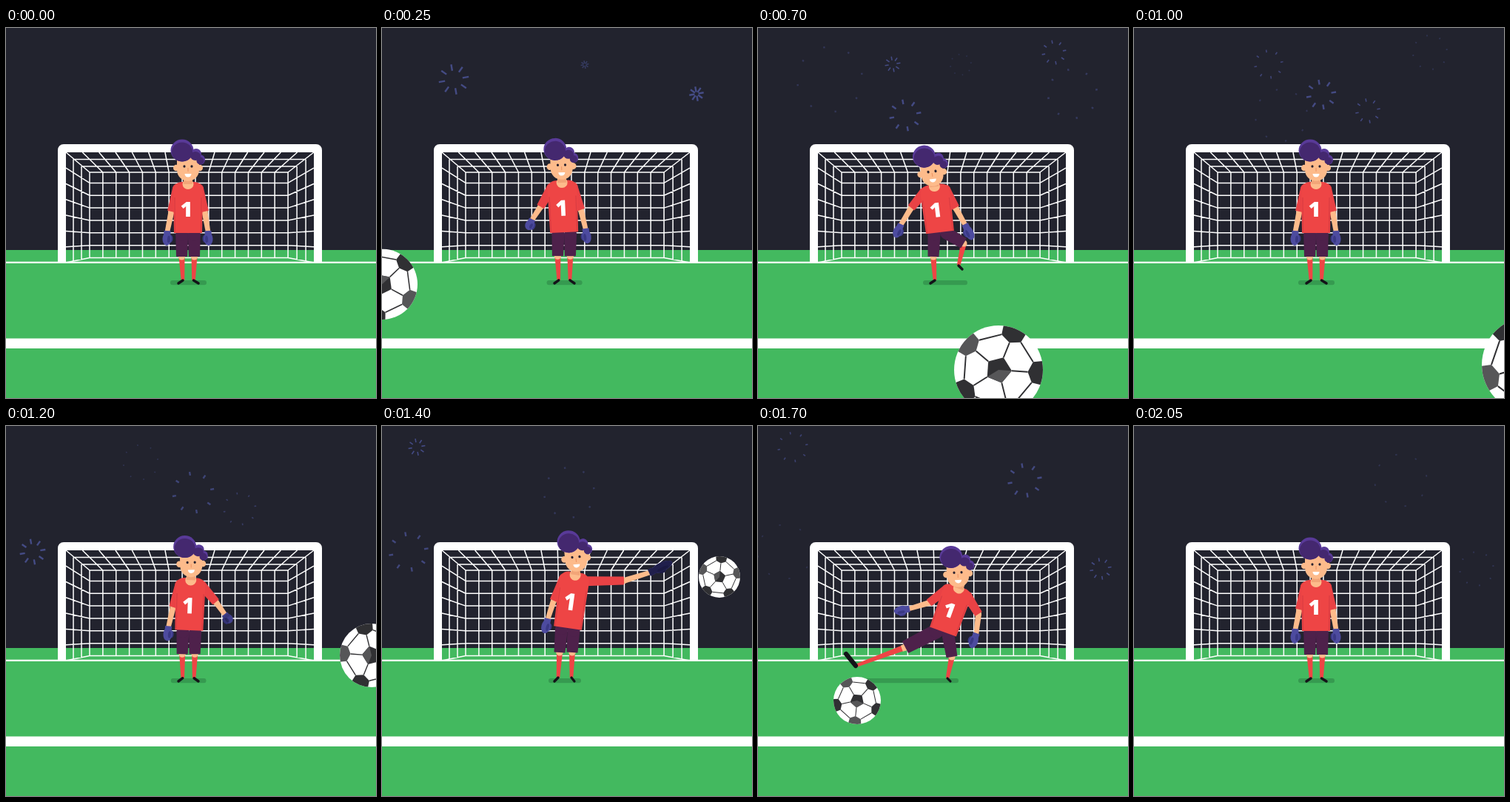
An HTML page with a canvas that plays this animation: 500 px wide and 500 px high, repeating every 2.1 s.

```html
<!DOCTYPE html>
<html lang="en">
<head>
<meta charset="utf-8">
<title>Goalkeeper</title>
<style>
  html, body { margin: 0; width: 100%; height: 100%; overflow: hidden; background: #22232e; }
  canvas { display: block; width: 100vw; height: 100vh; }
</style>
</head>
<body>
<canvas id="stage"></canvas>
<script>
const LOOP = 2100, STEP = 50, RAD = Math.PI / 180, TAU = Math.PI * 2;
const canvas = document.getElementById('stage');
const ctx = canvas.getContext('2d');
const SKIN = '#fdbb8b', RED = '#ee4545', SHORTS = '#4e214b', GLOVE = '#4d4b9f';

// Limbs hold three points: arm = elbow, wrist, fingertip; leg = knee, ankle, toe.
const idle = {
  head: [246, 187, 0], torso: [246, 277, 0, 1],
  lArm: [223.5, 248, 218, 275, 217, 294], rArm: [268.5, 248, 273, 275, 274, 294],
  lLeg: [237.5, 309, 239, 341, 233, 345], rLeg: [254.5, 309, 253.5, 341, 260, 345],
  shadow: [222, 271], shade: [0]
};
const saveLeft = {
  ...idle, head: [228.5, 177.5, -9], torso: [247, 273, -13, 1.1],
  lArm: [177, 215, 141, 196, 113, 185], rArm: [270, 236, 284, 259, 294, 280],
  lLeg: [237, 305, 238, 340, 233, 345], rLeg: [254, 305, 256, 340, 260, 345],
  shadow: [225, 269]
};
const kickEnd = {
  ...idle, head: [235, 194, -7], torso: [246, 276, -7, .94],
  lArm: [207, 243, 193, 266, 185, 283], rArm: [267, 243, 280, 266, 290, 286],
  lLeg: [237, 309, 239, 341, 233, 345], rLeg: [278, 291, 271, 321, 276, 326],
  shadow: [223, 283]
};
const saveRight = {
  ...idle, head: [262, 177, -5], torso: [251, 273, 8, 1.1],
  lArm: [232, 236, 224, 261, 219, 280], rArm: [327, 209, 362, 198, 392, 184],
  lLeg: [240, 306, 238, 340, 233, 345], rLeg: [257, 306, 256, 340, 260, 345],
  shadow: [225, 269], shade: [1]
};
const kickLeft = {
  ...idle, head: [270, 198, -3], torso: [250, 278, 20, .94],
  lArm: [231, 239, 204, 247, 184, 251], rArm: [298, 254, 295, 281, 288, 300],
  lLeg: [199, 299, 132, 324, 119, 308], rLeg: [262, 312, 256, 341, 260, 345],
  shadow: [132, 271]
};
const flipX = a => a.map((v, i) => i % 2 ? v : 492 - v);
const mirror = p => ({
  head: [492 - p.head[0], p.head[1], -p.head[2]],
  torso: [492 - p.torso[0], p.torso[1], -p.torso[2], p.torso[3]],
  lArm: flipX(p.rArm), rArm: flipX(p.lArm), lLeg: flipX(p.rLeg), rLeg: flipX(p.lLeg),
  shadow: [492 - p.shadow[1], 492 - p.shadow[0]], shade: [0]
});
const poses = [
  [0, idle], [150, idle], [500, saveLeft], [625, mirror(kickLeft)], [700, kickEnd], [850, idle],
  [1100, idle], [1400, saveRight], [1450, saveRight], [1650, kickLeft], [1700, kickLeft],
  [1900, idle], [LOOP, idle]
];

// time, x, y, radius, spin
const ballKeys = [
  [0, -80, 600, 85, -270], [50, -50, 500, 72, -255], [100, -35, 455, 65, -240],
  [300, 12, 310, 42, -170], [500, 49, 204, 27, -100], [600, 385, 330, 28, -40],
  [635, 366, 371, 32, -30], [700, 325, 462, 60, 4], [750, 295, 585, 90, 25],
  [800, 300, 650, 110, 45], [900, 600, 640, 100, 70], [950, 555, 510, 74, 80],
  [1000, 535, 455, 65, 91], [1200, 494, 310, 43, 112], [1400, 456, 204, 28, 132],
  [1450, 425, 200, 27, 120], [1650, 118, 335, 29, 42], [1700, 134, 371, 32, 24],
  [1750, 157, 432, 48, 0], [1800, 182, 510, 72, -30], [1850, 205, 615, 100, -60],
  [LOOP, -80, 600, 85, -270]
];

// x, y, reach, start, life
const bursts = [
  [97, 69.5, 46, 107, 632], [425, 89, 36, 204, 562], [199, 118, 36, 500, 520],
  [253, 90, 36, 760, 700], [36, 170, 37, 1030, 680], [360.5, 73.5, 36, 1410, 660],
  [274, 49.5, 15, 175, 580], [400, 33, 24, 388, 651], [182, 49, 24, 563, 660],
  [316, 112, 24, 700, 600], [47, 28.5, 24, 1243, 638], [463, 193, 24, 1445, 655]
];

const mix = (a, b, u) => a.map((v, i) => v + (b[i] - v) * u);

function span(keys, t) {
  let i = 0;
  while (i < keys.length - 2 && keys[i + 1][0] <= t) i++;
  const a = keys[i], b = keys[i + 1];
  return [a, b, (t - a[0]) / (b[0] - a[0])];
}

function poseAt(t) {
  const [a, b, k] = span(poses, t), u = k * k * (3 - 2 * k), pose = {};
  for (const part in idle) pose[part] = mix(a[1][part], b[1][part], u);
  return pose;
}

function rect(x, y, w, h, color) {
  ctx.fillStyle = color;
  ctx.fillRect(x, y, w, h);
}

function oval(x, y, rx, ry, color) {
  ctx.fillStyle = color;
  ctx.beginPath();
  ctx.ellipse(x, y, rx, ry, 0, 0, TAU);
  ctx.fill();
}

function line(x1, y1, x2, y2) {
  ctx.moveTo(x1, y1);
  ctx.lineTo(x2, y2);
}

function poly(points, color) {
  ctx.fillStyle = color;
  ctx.beginPath();
  points.forEach(p => ctx.lineTo(p[0], p[1]));
  ctx.closePath();
  ctx.fill();
}

// Limb segment, round at its start and cut straight at its end.
function taper(x1, y1, x2, y2, w1, w2, color) {
  const d = Math.hypot(x2 - x1, y2 - y1) || 1;
  const nx = (y1 - y2) / d / 2, ny = (x2 - x1) / d / 2;
  poly([[x1 + nx * w1, y1 + ny * w1], [x2 + nx * w2, y2 + ny * w2],
        [x2 - nx * w2, y2 - ny * w2], [x1 - nx * w1, y1 - ny * w1]], color);
  oval(x1, y1, w1 / 2, w1 / 2, color);
}

function drawBurst([x, y, reach, start, life], t) {
  const u = (t - start) / life;
  if (u <= 0 || u >= 1) return;
  const r = reach * u ** .7, len = reach * .16 * (1 - u * u) + 1.5;
  ctx.strokeStyle = '#454c86';
  ctx.globalAlpha = (1 - .65 * u ** 3) * (reach < 20 ? .6 : 1);
  ctx.lineWidth = reach > 30 ? 2.4 : 1.6;
  ctx.beginPath();
  for (let i = 0; i < 8; i++) {
    const a = (i * 45 - 100) * RAD, c = Math.cos(a), s = Math.sin(a);
    const r0 = Math.max(1, r - len / 2), r1 = r + len / 2;
    line(x + c * r0, y + s * r0, x + c * r1, y + s * r1);
  }
  ctx.stroke();
  ctx.globalAlpha = 1;
}

function drawPitch(t) {
  rect(0, 0, 500, 500, '#22232e');
  bursts.forEach(b => drawBurst(b, t));
  rect(0, 300, 500, 200, '#43b95f');
  rect(0, 315.7, 500, 2.3, '#fff');
  rect(0, 419.5, 500, 13.5, '#fff');
}

function drawGoal() {
  ctx.strokeStyle = '#fff';
  ctx.lineWidth = 1.5;
  ctx.beginPath();
  for (let i = 0; i <= 15; i++) {
    const x = 113 + 17.87 * i;
    line(81 + 22.33 * i, 168, x, 195);
    line(x, 195, x, 310.5);
  }
  for (let i = 0; i < 7; i++) {
    const y = 310.5 - 16.85 * i, edge = 317 - 21.3 * i;
    line(113, y, 381, y);
    line(81, edge, 113, y);
    line(416, edge, 381, y);
  }
  for (const [dx, y, foot] of [[10, 177.5, 315], [21, 187, 313], [32, 195, 310.5]]) {
    const right = 416 - dx * 1.09;
    line(81 + dx, y, right, y);
    line(81 + dx, y, 81 + dx, foot);
    line(right, y, right, foot);
  }
  ctx.stroke();
  ctx.lineWidth = 11;
  ctx.lineJoin = 'round';
  ctx.beginPath();
  ctx.moveTo(75.5, 318);
  ctx.lineTo(75.5, 165);
  ctx.quadraticCurveTo(75.5, 162.5, 78, 162.5);
  ctx.lineTo(419, 162.5);
  ctx.quadraticCurveTo(421.5, 162.5, 421.5, 165);
  ctx.lineTo(421.5, 318);
  ctx.stroke();
}

function drawLeg(hip, [kx, ky, ax, ay, tx, ty]) {
  const long = Math.hypot(kx - hip[0], ky - hip[1]) > 36;
  const d = Math.hypot(ax - kx, ay - ky) || 1;
  taper(kx, ky, ax, ay, 8, 4.5, RED);
  taper(kx, ky, kx + (ax - kx) / d * (long ? 5 : 2), ky + (ay - ky) / d * (long ? 5 : 2), 9, 8.5, SKIN);
  ctx.strokeStyle = '#131318';
  ctx.lineCap = 'round';
  ctx.lineWidth = 2 + Math.hypot(tx - ax, ty - ay) * .2;
  ctx.beginPath();
  line(ax, ay, tx, ty);
  ctx.stroke();
  ctx.lineCap = 'butt';
  taper(hip[0], hip[1], kx, ky, long ? 20 : 17, long ? 18 : 15, SHORTS);
}

function drawForearm([ex, ey, wx, wy, gx, gy], side, shade) {
  taper(ex, ey, wx, wy, 8, 6.5, SKIN);
  const len = Math.hypot(gx - wx, gy - wy);
  ctx.save();
  ctx.translate(wx, wy);
  ctx.rotate(Math.atan2(gy - wy, gx - wx) - Math.PI / 2);
  const paint = (main, thumb) => {
    oval(side * 5, len * .5, 3, 5, thumb);
    oval(0, len * .52, 6, len * .48, main);
    rect(-4.5, -1, 9, 6, main);
    oval(side * 2.5, len * .55, 2, len * .25, thumb);
  };
  paint(GLOVE, '#3a3985');
  if (shade) {
    ctx.globalAlpha = shade;
    paint('#201f4c', '#1b1a42');
  }
  ctx.restore();
}

function drawTorso(x, y, rot, scale) {
  ctx.save();
  ctx.translate(x, y);
  ctx.rotate(rot * RAD);
  ctx.scale(1, scale);
  ctx.fillStyle = RED;
  ctx.beginPath();
  ctx.moveTo(-19, 0);
  ctx.lineTo(-20, -56);
  ctx.quadraticCurveTo(-20, -68, -9, -69);
  ctx.lineTo(9, -69);
  ctx.quadraticCurveTo(20, -68, 20, -56);
  ctx.lineTo(19, 0);
  ctx.fill();
  ctx.strokeStyle = '#d93c42';
  ctx.lineWidth = 1.2;
  ctx.beginPath();
  line(-18, -48, -17.5, -1);
  line(18, -48, 17.5, -1);
  ctx.stroke();
  oval(0, -66, 7.5, 7, SKIN);
  rect(-6, -76, 12, 10, '#f2a578');
  ctx.fillStyle = '#fff';
  ctx.font = '800 29px "Open Sans", "Noto Sans", sans-serif';
  ctx.textAlign = 'center';
  ctx.fillText('1', -2, -22);
  ctx.restore();
}

function drawHead(x, y, rot) {
  ctx.save();
  ctx.translate(x, y);
  ctx.rotate(rot * RAD);
  oval(-16, 2, 4, 4.3, SKIN);
  oval(16, 2, 4, 4.3, SKIN);
  ctx.fillStyle = SKIN;
  ctx.beginPath();
  ctx.moveTo(-15, -14);
  ctx.lineTo(15, -14);
  ctx.lineTo(15, 4);
  ctx.bezierCurveTo(15, 25, -15, 25, -15, 4);
  ctx.fill();
  oval(-5, 0, 1.6, 1.8, '#26202f');
  oval(5, 0, 1.6, 1.8, '#26202f');
  ctx.strokeStyle = '#ee9868';
  ctx.lineWidth = 1.2;
  ctx.beginPath();
  line(0, 2, 0, 7);
  ctx.stroke();
  ctx.fillStyle = '#fff';
  ctx.beginPath();
  ctx.arc(0, 10, 4.5, 0, Math.PI);
  ctx.fill();
  const dark = '#44286f', light = '#593a98';
  oval(11, -17, 7, 7, light);
  oval(17.5, -9, 5.5, 6.5, light);
  oval(-8, -21.5, 15.5, 15, light);
  oval(10, -14, 7, 6, dark);
  oval(16.5, -7.5, 5, 5, dark);
  oval(-8, -19.5, 14, 13, dark);
  ctx.restore();
}

function drawKeeper(p) {
  const [x, y, rot, scale] = p.torso;
  const c = Math.cos(rot * RAD), s = Math.sin(rot * RAD);
  const joint = (dx, dy) => [x + dx * c - dy * s, y + dx * s + dy * c];
  const [s0, s1] = p.shadow;
  ctx.fillStyle = '#369a50';
  ctx.beginPath();
  ctx.roundRect(s0, 341, s1 - s0, 6.2, 3);
  ctx.fill();
  drawLeg(joint(-8.3, 2), p.lLeg);
  drawLeg(joint(8.3, 2), p.rLeg);
  drawForearm(p.lArm, 1, 0);
  drawForearm(p.rArm, -1, p.shade[0]);
  for (const [arm, side] of [[p.lArm, -1], [p.rArm, 1]]) {
    taper(...joint(side * 14.5, -60 * scale), arm[0], arm[1], 13, 11, '#e94245');
  }
  drawTorso(...p.torso);
  drawHead(...p.head);
}

function drawBall([, x, y, r, spin]) {
  const at = (d, deg) => [d * r * Math.cos(deg * RAD), d * r * Math.sin(deg * RAD)];
  const dark = '#303033', grey = '#565658';
  ctx.save();
  ctx.translate(x, y);
  ctx.beginPath();
  ctx.arc(0, 0, r, 0, TAU);
  ctx.clip();
  rect(-r, -r, 2 * r, 2 * r, '#fff');
  const angles = [0, 1, 2, 3, 4].map(i => spin + i * 72);
  ctx.strokeStyle = dark;
  ctx.lineWidth = Math.max(1, r * .032);
  ctx.beginPath();
  for (const a of angles) {
    line(...at(.3, a), ...at(.66, a));
    line(...at(.8, a + 17), ...at(.8, a + 55));
  }
  ctx.stroke();
  angles.forEach((a, i) => {
    poly([at(.66, a), at(.8, a + 17), at(1.1, a + 15), at(1.1, a - 15), at(.8, a - 17)],
      i % 2 ? grey : dark);
  });
  poly(angles.map(a => at(.3, a)), dark);
  poly([[0, 0], at(.3, spin), at(.3, spin + 72), at(.3, spin + 144)], grey);
  ctx.restore();
}

function resize() {
  const ratio = window.devicePixelRatio || 1;
  canvas.width = innerWidth * ratio;
  canvas.height = innerHeight * ratio;
}

const start = performance.now();

function draw() {
  const t = Math.floor((performance.now() - start) % LOOP / STEP) * STEP;
  ctx.setTransform(canvas.width / 500, 0, 0, canvas.height / 500, 0, 0);
  drawPitch(t);
  drawGoal();
  drawKeeper(poseAt(t));
  const [a, b, u] = span(ballKeys, t);
  drawBall(mix(a, b, u));
  requestAnimationFrame(draw);
}

addEventListener('resize', resize);
resize();
draw();
</script>
</body>
</html>
```
